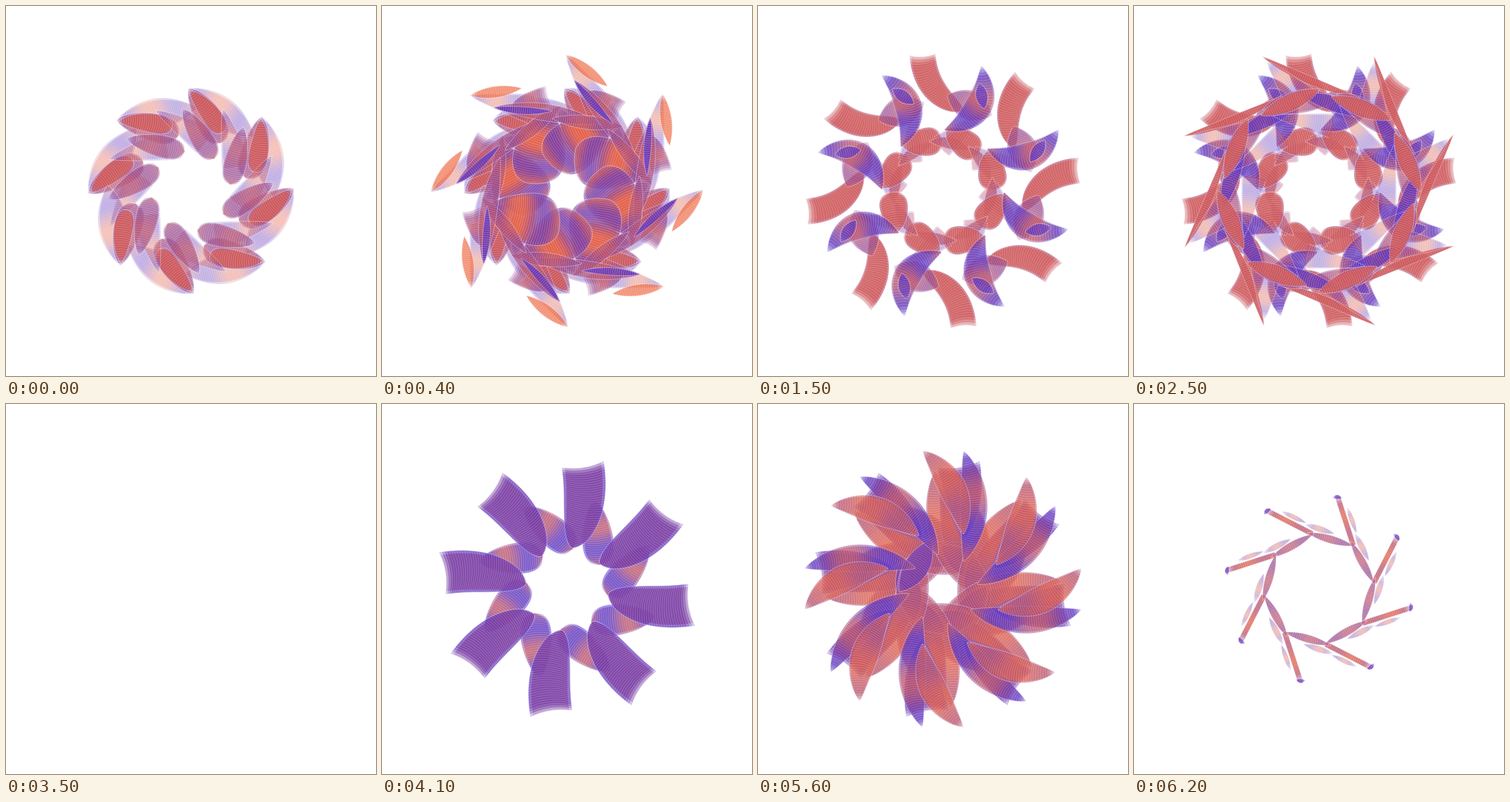
These frames come from a looping animation (540x540 px, 6500 ms). An HTML page with a canvas:

```html
<!DOCTYPE html>
<html lang="en">
<head>
<meta charset="utf-8">
<title>Woven rosettes</title>
<style>
html, body { margin: 0; width: 100%; height: 100%; overflow: hidden; background: #fff; }
canvas { display: block; width: 540px; height: 540px; }
</style>
</head>
<body>
<canvas id="stage" width="540" height="540"></canvas>
<script>
const SIZE = 540, MID = SIZE / 2, LOOP = 6500, COPIES = 8;
const BLUE = [75, 45, 205], ORANGE = [246, 104, 56];
const ctx = document.getElementById('stage').getContext('2d');

// Width along the spine, from 0 (start) to 1 (end).
const SHAPE = {
  lens: s => Math.sin(Math.PI * s) ** 0.8,
  drop: s => 1.95 * s ** 0.7 * (1 - s) ** 0.35,
  fan: s => s ** 0.8,
  flat: s => (1 - s ** 3) ** 0.6,
  bar: () => 1
};

// warm: share of orange; depth: opacity; pulse: swing of warm along the spine.
const INK = {
  red: { warm: 0.76, depth: 0.92, pulse: 0 },
  mauve: { warm: 0.54, depth: 0.72, pulse: 0.12 },
  weave: { warm: 0.62, depth: 0.85, pulse: 0.4 },
  violet: { warm: 0.1, depth: 0.8, pulse: 0.1 },
  swirl: { warm: 0.36, depth: 0.8, pulse: 0.3 },
  plum: { warm: 0.27, depth: 0.93, pulse: 0 },
  orange: { warm: 1, depth: 0.7, pulse: 0 },
  coral: { warm: 0.74, depth: 0.8, pulse: 0.12 },
  haze: { warm: 0.5, depth: 0.38, pulse: 0.4 }
};

const clamp = v => Math.min(1, Math.max(0, v));
const mix = t => BLUE.map((b, i) => Math.round(b + (ORANGE[i] - b) * clamp(t)));

// A petal is a bent spine with overlapping translucent slices woven across it.
const petal = (shape, ink, from, to, width, bend = 0) => g => {
  const { warm, depth, pulse } = INK[ink], profile = SHAPE[shape];
  const dx = to[0] - from[0], dy = to[1] - from[1], len = Math.hypot(dx, dy);
  const cx = (from[0] + to[0]) / 2 - 2 * bend * dy / len;
  const cy = (from[1] + to[1]) / 2 + 2 * bend * dx / len;
  const count = Math.ceil(len / 1.6), span = Math.min(8, count >> 1);
  const alpha = 1 - (1 - depth) ** (1 / span);

  function rib(s, scale) {
    const r = 1 - s;
    const x = r * r * from[0] + 2 * r * s * cx + s * s * to[0] - MID;
    const y = r * r * from[1] + 2 * r * s * cy + s * s * to[1] - MID;
    const tx = r * (cx - from[0]) + s * (to[0] - cx);
    const ty = r * (cy - from[1]) + s * (to[1] - cy);
    const k = profile(s) * width / 2 * scale / Math.hypot(tx, ty);
    return {
      left: [x - ty * k, y + tx * k],
      bow: [x + tx * k * 0.3, y + ty * k * 0.3],
      right: [x + ty * k, y - tx * k]
    };
  }

  for (let i = 0; i < count; i++) {
    const s = i / count, even = i % 2 === 0, scale = even ? 1 : 0.86;
    const a = rib(s, scale), b = rib(Math.min(1, (i + span) / count), scale);
    const tone = warm - pulse * Math.cos(9 * s) + (even ? -0.12 : 0.12);
    g.beginPath();
    g.moveTo(...a.left);
    g.quadraticCurveTo(...a.bow, ...a.right);
    g.lineTo(...b.right);
    g.quadraticCurveTo(...b.bow, ...b.left);
    g.fillStyle = `rgba(${mix(tone)},${alpha})`;
    g.fill();
    if (even) {
      g.beginPath();
      g.moveTo(...a.left);
      g.quadraticCurveTo(...a.bow, ...a.right);
      g.strokeStyle = 'rgba(255,255,255,.35)';
      g.stroke();
    }
  }

  g.strokeStyle = 'rgba(255,255,255,.6)';
  for (const side of ['left', 'right']) {
    g.beginPath();
    for (let i = 0; i <= count; i++) g.lineTo(...rib(i / count, 1)[side]);
    g.stroke();
  }
};

// Copies go round clockwise; the last one, on top, sits lower left.
function layer(shift, ...petals) {
  let image = null;
  return () => {
    if (image) return image;
    image = document.createElement('canvas');
    image.width = image.height = SIZE;
    const g = image.getContext('2d');
    g.lineWidth = 0.6;
    for (let k = 1; k <= COPIES; k++) {
      g.setTransform(1, 0, 0, 1, MID, MID);
      g.rotate((k + shift) * 2 * Math.PI / COPIES);
      petals.forEach(draw => draw(g));
    }
    return image;
  };
}

const wreath = layer(5,
  petal('lens', 'haze', [266, 120], [362, 190], 46),
  petal('fan', 'haze', [218, 152], [290, 195], 46),
  petal('drop', 'mauve', [266, 120], [314, 200], 42, -3),
  petal('drop', 'red', [268, 124], [316, 185], 28, -3),
  petal('drop', 'mauve', [258, 150], [304, 223], 33));

const fans = layer(5,
  petal('fan', 'haze', [268, 71], [318, 148], 44),
  petal('lens', 'orange', [268, 71], [329, 117], 17),
  petal('flat', 'mauve', [350, 153], [298, 126], 30));

const ring = layer(5,
  petal('drop', 'weave', [337, 172], [247, 232], 76, 6));

const blades = layer(5,
  petal('lens', 'mauve', [248, 164], [352, 176], 20),
  petal('lens', 'mauve', [279, 107], [374, 236], 25, -5));

const quills = layer(5,
  petal('lens', 'violet', [280, 107], [337, 172], 11, 2));

const hub = layer(5,
  petal('lens', 'coral', [250, 198], [308, 210], 17, -4),
  petal('fan', 'haze', [335, 150], [268, 205], 36),
  petal('drop', 'red', [274, 180], [322, 216], 42));

const hooks = layer(5,
  petal('flat', 'red', [240, 71], [300, 152], 38, 16),
  petal('lens', 'mauve', [342, 160], [276, 130], 44),
  petal('lens', 'swirl', [326, 87], [272, 181], 40, -26),
  petal('lens', 'violet', [323, 112], [330, 150], 18));

const horns = layer(5,
  petal('lens', 'mauve', [296, 128], [385, 195], 34, -4),
  petal('lens', 'violet', [350, 150], [394, 242], 22, -3),
  petal('lens', 'red', [350, 72], [408, 215], 12, 5));

const lances = layer(5,
  petal('fan', 'haze', [350, 82], [346, 158], 48),
  petal('fan', 'haze', [300, 145], [350, 215], 36),
  petal('lens', 'red', [376, 166], [288, 132], 25));

const arcs = layer(5, petal('lens', 'mauve', [292, 79], [300, 205], 36, -25));
const scallops = layer(5, petal('drop', 'swirl', [310, 140], [318, 235], 46));
const sails = layer(5, petal('flat', 'plum', [293, 88], [277, 210], 62, -9));

const petals = layer(0,
  petal('drop', 'coral', [155, 400], [226, 222], 48, 25),
  petal('lens', 'plum', [206, 274], [252, 198], 36, 3));

const vanes = layer(5, petal('lens', 'swirl', [300, 68], [300, 230], 40, -15));
const claws = layer(5, petal('lens', 'coral', [240, 68], [300, 190], 40, -15));

const sticks = layer(5,
  petal('lens', 'haze', [311, 150], [325, 189], 8),
  petal('lens', 'haze', [322, 188], [343, 229], 10),
  petal('bar', 'coral', [297, 135], [320, 206], 8),
  petal('lens', 'mauve', [316, 200], [350, 261], 12),
  petal('lens', 'violet', [290, 137], [303, 138], 7, -2));

const CLEAR = null;
const score = [
  [0, CLEAR], [0, wreath], [100, fans], [200, ring], [300, blades], [400, quills],
  [900, CLEAR], [1000, hub], [1500, hooks], [2000, horns], [2500, lances], [3000, arcs],
  [3500, CLEAR], [3600, scallops], [4100, sails], [4600, petals], [5100, vanes], [5600, claws],
  [6100, CLEAR], [6200, sticks]
];

let start = null, shown = -1;

function tick(now) {
  if (start === null) start = now;
  const time = (now - start) % LOOP;
  const step = score.filter(([at]) => at <= time).length;
  if (step !== shown) {
    shown = step;
    score.slice(0, step).forEach(([, image]) => {
      if (image) {
        ctx.drawImage(image(), 0, 0);
      } else {
        ctx.fillStyle = '#fff';
        ctx.fillRect(0, 0, SIZE, SIZE);
      }
    });
  }
  requestAnimationFrame(tick);
}
requestAnimationFrame(tick);
</script>
</body>
</html>
```
